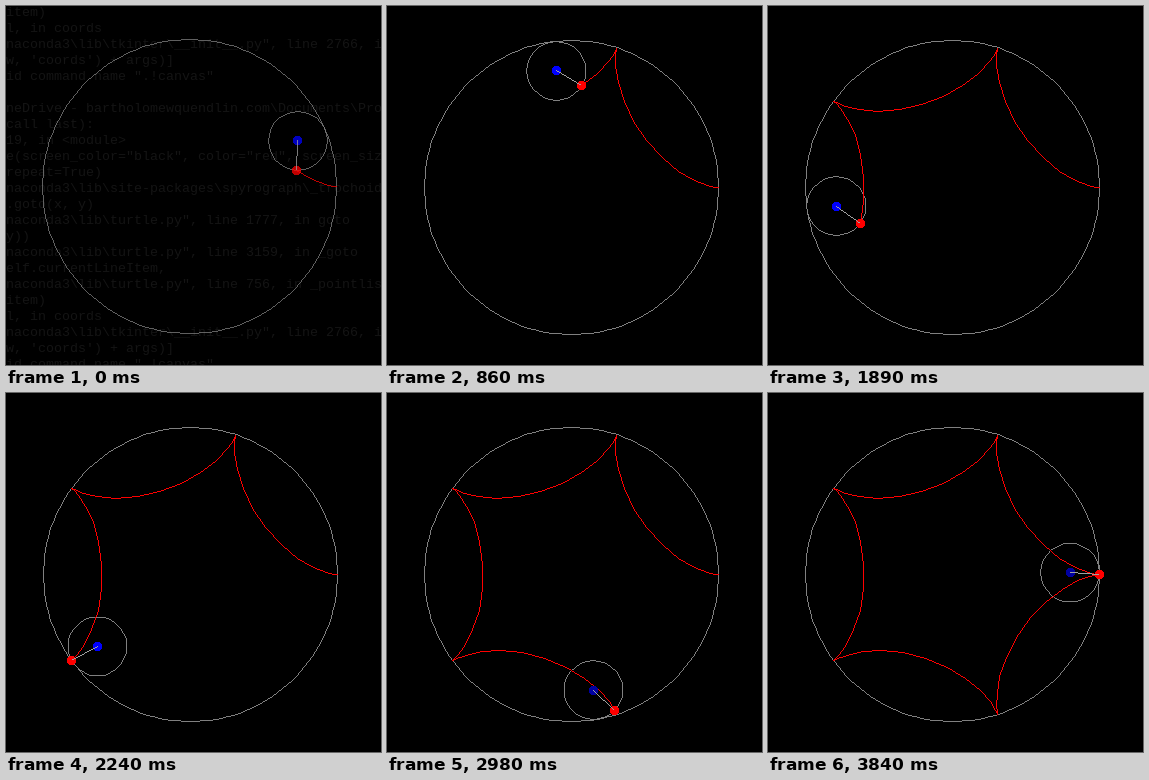
An HTML page with a canvas for the animation above (3920 ms loop, 375 by 359 pixels).

```html
<!DOCTYPE html>
<html lang="en">
<head>
<meta charset="utf-8">
<title>Hypocycloid</title>
<style>
html, body { margin: 0; height: 100%; overflow: hidden; background: #000; }
canvas { display: block; }
</style>
</head>
<body>
<canvas width="375" height="359"></canvas>
<script>
const ctx = document.querySelector('canvas').getContext('2d');
const LOOP = 3920, STEP = 0.1, R = 147, r = R / 5, ARM = R - r;
const GREY = '#808080', ROD = '#a0a0a0', RED = '#ff0000';

// [step, start in ms]; the steps between are evenly spaced
const TIMING = [[0, 0], [1, 30], [7, 420], [8, 470], [9, 540], [10, 590], [18, 1100],
  [19, 1180], [21, 1300], [22, 1390], [27, 1690], [28, 1770], [30, 1890], [31, 1970],
  [36, 2290], [37, 2360], [40, 2560], [41, 2610], [44, 2850], [45, 2920], [52, 3340],
  [53, 3410], [54, 3460], [60, 3840]];

const starts = [0];
for (let i = 1; i < TIMING.length; i++) {
  const [s0, t0] = TIMING[i - 1], [s1, t1] = TIMING[i];
  for (let s = s0 + 1; s <= s1; s++)
    starts[s] = Math.round((t0 + (t1 - t0) * (s - s0) / (s1 - s0)) / 10) * 10;
}

// Terminal output that shows through at the very start
const TERMINAL = String.raw`item)
l, in coords
naconda3\lib\tkinter\__init__.py", line 2766, in coords
w, 'coords') + args)]
id command name ".!canvas"

neDrive - bartholomewquendlin.com\Documents\Projects
call last):
19, in <module>
e(screen_color="black", color="red", screen_size=
repeat=True)
naconda3\lib\site-packages\spyrograph\_trochoid.py
.goto(x, y)
naconda3\lib\turtle.py", line 1777, in goto
y))
naconda3\lib\turtle.py", line 3159, in _goto
elf.currentLineItem,
naconda3\lib\turtle.py", line 756, in _pointlist
item)
l, in coords
naconda3\lib\tkinter\__init__.py", line 2766, in coords
w, 'coords') + args)]
id command name ".!canvas"`.split('\n');

const hub = a => [ARM * Math.cos(a), -ARM * Math.sin(a)];
const tip = a => {
  const [x, y] = hub(a);
  return [x + r * Math.cos(4 * a), y + r * Math.sin(4 * a)];
};

// Hard-edged one-pixel polyline with its corners on whole pixels
function lines(points, color) {
  ctx.fillStyle = color;
  const corners = points.map(p => p.map(Math.round));
  for (let i = 1; i < corners.length; i++) {
    const [x, y] = corners[i - 1];
    const dx = corners[i][0] - x, dy = corners[i][1] - y;
    const n = Math.max(Math.abs(dx), Math.abs(dy));
    for (let k = 0; k < n; k++)
      ctx.fillRect(Math.round(x + dx * k / n), Math.round(y + dy * k / n), 1, 1);
  }
}

function circle([cx, cy], radius) {
  const sides = 4 * Math.round(radius / 4);
  lines(Array.from({ length: sides + 1 }, (_, i) => {
    const a = 2 * Math.PI * i / sides;
    return [cx + radius * Math.cos(a), cy + radius * Math.sin(a)];
  }), GREY);
}

function dot([cx, cy], color) {
  ctx.fillStyle = color;
  for (let y = -4; y <= 4; y++) {
    const w = Math.floor(Math.sqrt(22 - y * y));
    ctx.fillRect(Math.round(cx) - w, Math.round(cy) + y, 2 * w + 1, 1);
  }
}

function draw(step) {
  const opening = step === 0;
  const count = Math.max(step, 1) + 3;
  const center = hub(count * STEP), pen = tip(count * STEP);
  const shift = opening ? -1 : 0;

  ctx.setTransform(1, 0, 0, 1, 0, 0);
  ctx.globalAlpha = 1;
  ctx.fillStyle = '#000';
  ctx.fillRect(0, 0, 375, 359);
  if (opening) {
    ctx.font = '13.33px "Liberation Mono", monospace';
    ctx.textBaseline = 'middle';
    ctx.fillStyle = '#141414';
    TERMINAL.forEach((text, i) => ctx.fillText(text, 0, 6 + i * 16));
    ctx.globalAlpha = 0.75;
  }

  ctx.translate(184 + shift, 181 + shift);
  circle([0, 0], R);
  circle(center, r);
  lines(Array.from({ length: count + 1 }, (_, i) => tip(i * STEP)), RED);
  dot(center, step < 45 ? '#0000ff' : '#0000a0');
  dot(pen, RED);
  lines([center, pen], ROD);
}

function tick() {
  const t = performance.now() % LOOP;
  draw(starts.findLastIndex(start => start <= t));
  requestAnimationFrame(tick);
}
tick();
</script>
</body>
</html>
```
